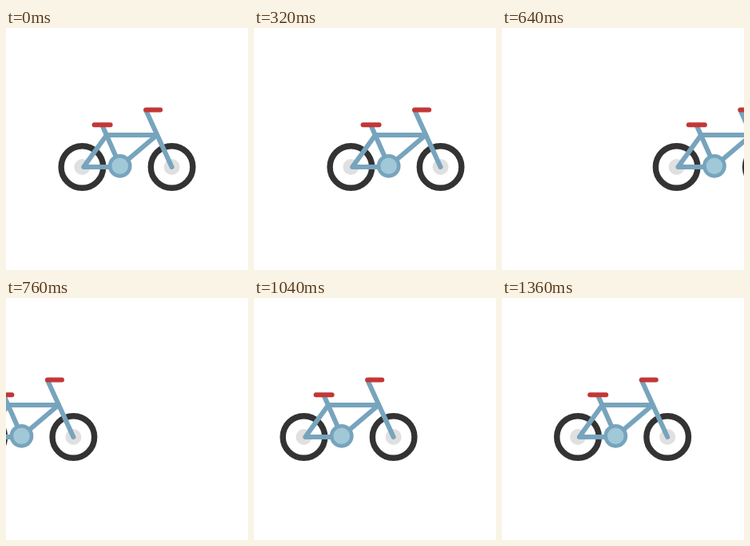
These frames come from a looping animation (303x303 px, 1.4 s). An HTML page with a canvas:

```html
<!DOCTYPE html>
<html lang="en">
<head>
<meta charset="utf-8">
<title>Bicycle</title>
<style>
html, body { margin: 0; width: 100%; height: 100%; overflow: hidden; background: #fff; }
canvas { display: block; width: 100vw; height: 100vh; }
</style>
</head>
<body>
<canvas id="stage"></canvas>
<script>
const SIZE = 303, LOOP = 1400, TRAVEL = 194.6;
const DARK = '#333', GREY = '#e0e0e0', BLUE = '#77a4bd', LIGHT = '#a0c8d7', RED = '#c33737';
const canvas = document.getElementById('stage');
const ctx = canvas.getContext('2d');

// cubic-bezier(0.5, 0, 1, 0.5): x = 1.5s - 0.5s^3, y = 1.5s^2 - 0.5s^3
function easeIn(x) {
  let lo = 0, hi = 1;
  for (let i = 0; i < 30; i++) {
    const s = (lo + hi) / 2;
    if (1.5 * s - 0.5 * s ** 3 < x) lo = s; else hi = s;
  }
  return 1.5 * lo * lo - 0.5 * lo ** 3;
}

// Ride off to the right, jump to the left, glide back to the middle
function offsetAt(ms) {
  const u = (ms % LOOP) / LOOP * 2;
  return u < 1 ? TRAVEL * easeIn(u) : -TRAVEL * easeIn(2 - u);
}

function disc(x, y, r, color) {
  ctx.fillStyle = color;
  ctx.beginPath();
  ctx.arc(x, y, r, 0, Math.PI * 2);
  ctx.fill();
}

function ring(x, y, r, width, color) {
  ctx.strokeStyle = color;
  ctx.lineWidth = width;
  ctx.beginPath();
  ctx.arc(x, y, r, 0, Math.PI * 2);
  ctx.stroke();
}

function tube(color, ...points) {
  ctx.strokeStyle = color;
  ctx.lineWidth = 6;
  ctx.beginPath();
  points.forEach(([x, y]) => ctx.lineTo(x, y));
  ctx.stroke();
}

function wheel(x) {
  ring(x, 174, 26.3, 7.4, DARK);
  disc(x, 174, 10, GREY);
}

function drawBike() {
  wheel(95.4);
  wheel(207.6);
  tube(BLUE, [143, 174], [97.2, 174], [126, 134], [189, 134], [143, 173]);
  tube(BLUE, [120.5, 122], [143, 173]);
  tube(BLUE, [175.2, 103], [207.6, 174]);
  disc(142.7, 172.8, 13, LIGHT);
  ring(142.7, 172.8, 12.6, 4.6, BLUE);
  tube(RED, [110.6, 121.2], [130.6, 121.2]);
  tube(RED, [175.2, 102.6], [193.2, 102.6]);
}

function render(now) {
  const w = Math.round(innerWidth * devicePixelRatio);
  const h = Math.round(innerHeight * devicePixelRatio);
  if (canvas.width !== w || canvas.height !== h) {
    canvas.width = w;
    canvas.height = h;
  }
  ctx.setTransform(w / SIZE, 0, 0, h / SIZE, 0, 0);
  ctx.fillStyle = '#fff';
  ctx.fillRect(0, 0, SIZE, SIZE);
  ctx.lineCap = ctx.lineJoin = 'round';
  ctx.translate(offsetAt(now), 0);
  drawBike();
}

let start;
function tick(now) {
  start ??= now;
  render(Math.max(0, now - start));
  requestAnimationFrame(tick);
}
render(0);
requestAnimationFrame(tick);
</script>
</body>
</html>
```
